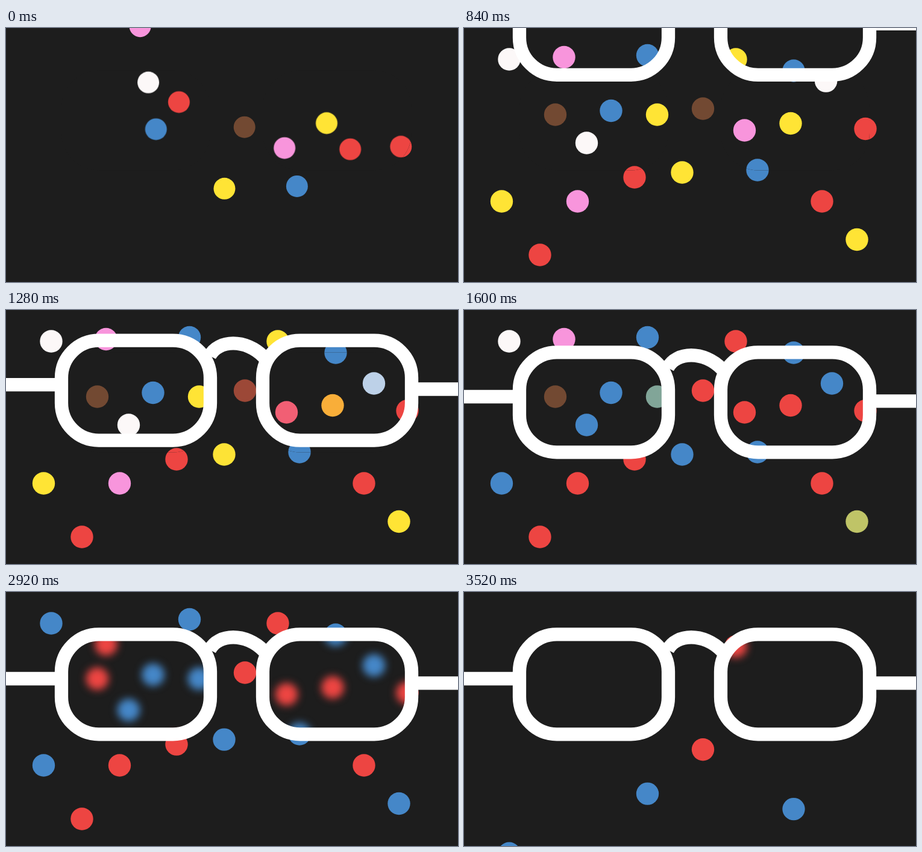
An HTML page without scripts for the animation above (3.56 s loop, 750x422 px).

```html
<!DOCTYPE html>
<html lang="en">
<head>
<meta charset="utf-8">
<title>Dots and glasses</title>
<style>
  /* One clock in milliseconds drives every part. */
  @property --t { syntax: "<number>"; inherits: true; initial-value: 0; }
  @keyframes clock { from { --t: 0; } to { --t: 3560; } }

  html, body { margin: 0; width: 100%; height: 100%; overflow: hidden; background: #1d1d1d; }
  svg { display: block; width: 750px; height: 422px; animation: clock 3.56s linear infinite; }

  .red { --from: #ed4542; --to: #ed4542; }
  .blue { --from: #4587c8; --to: #4587c8; }
  .yellow { --from: #ffe435; }
  .pink { --from: #f895dc; }
  .brown { --from: #724932; }
  .white { --from: #fcf8f8; }
  .to-red { --to: #ed4542; }
  .to-blue { --to: #4587c8; }

  /* --in: entry start, --at: colour change, --out: drop start */
  .dots circle {
    r: 18.7px;
    --in: -480;
    --at: 0;
    --dx: calc((375 - var(--x)) * .2);
    --left: calc(1 - clamp(0, (var(--t) - var(--in)) / 480, 1));
    --away: calc(var(--left) * var(--left));
    --k: calc(max(0, var(--t) - var(--out)) / 40);
    --drop: calc(5.268 * var(--k) * var(--k) / (1 + .0826 * var(--k)));
    --mix: clamp(0, (var(--t) - var(--at)) / 120, 1);
    fill: color-mix(in srgb, var(--to) calc(var(--mix) * 100%), var(--from));
    transform: translate(
      calc((var(--x) + var(--dx) * var(--away)) * 1px),
      calc((var(--y) - (var(--y) + 60) * var(--away) + var(--drop)) * 1px));
  }

  .dots {
    --rest: max(0, 1 - var(--t) / 480);
    --pan: calc(var(--rest) * var(--rest));
    transform-origin: 375px 211px;
    transform: translateY(calc(var(--pan) * 28px)) scale(calc(1 - .037 * var(--pan)));
  }

  .blurred { filter: blur(calc(clamp(0, (var(--t) - 1760) / 800, 1) * 6.6px)); }

  .glasses {
    fill: none;
    stroke: #fff;
    stroke-width: 22.3px;
    transform: translateY(calc(pow(max(0, (1580 - var(--t)) / 740), 2.3) * -159px));
  }
</style>
</head>
<body>
<svg viewBox="0 0 750 422">
  <defs>
    <rect id="left-lens" x="92" y="70.4" width="247" height="166" rx="62"/>
    <rect id="right-lens" x="426" y="70.4" width="247" height="166" rx="62"/>
    <clipPath id="lenses">
      <use href="#left-lens"/>
      <use href="#right-lens"/>
    </clipPath>
  </defs>

  <rect width="750" height="422" fill="#1d1d1d"/>

  <g id="dots" class="dots">
    <circle class="white to-blue" style="--x:75;--y:52;--in:360;--at:1680;--out:3040"/>
    <circle class="pink to-red" style="--x:166;--y:48.5;--in:300;--at:1720;--out:2800"/>
    <circle class="blue" style="--x:304.5;--y:45.5;--in:240;--out:3120"/>
    <circle class="yellow to-red" style="--x:451;--y:52;--in:200;--at:1320;--out:3400"/>
    <circle class="blue" style="--x:547;--y:71;--in:100;--out:3120"/>
    <circle class="white to-blue" style="--x:610.5;--y:122;--in:568;--dx:-53;--at:1240;--out:2920"/>
    <circle class="brown to-red" style="--x:151.5;--y:144;--in:40;--at:1640;--out:3040"/>
    <circle class="blue" style="--x:244;--y:137.5;--out:3040"/>
    <circle class="yellow to-blue" style="--x:320.5;--y:144;--in:120;--at:1520;--out:3040"/>
    <circle class="brown to-red" style="--x:396.5;--y:134;--at:1240;--out:3280"/>
    <circle class="pink to-red" style="--x:465.5;--y:170;--at:1200;--out:2920"/>
    <circle class="yellow to-red" style="--x:542;--y:158.5;--in:-297;--dx:-28;--at:1240;--out:3080"/>
    <circle class="red" style="--x:666;--y:167.5;--out:2960"/>
    <circle class="white to-blue" style="--x:203.5;--y:191;--in:-128;--dx:51;--at:1400;--out:2880"/>
    <circle class="red" style="--x:283;--y:248;--in:-136;--dx:1;--out:2880"/>
    <circle class="yellow to-blue" style="--x:362;--y:240;--at:1280;--out:2880"/>
    <circle class="blue" style="--x:487;--y:236;--out:2920"/>
    <circle class="yellow to-blue" style="--x:62.5;--y:288;--in:350;--dx:72;--at:1440;--out:3040"/>
    <circle class="pink to-red" style="--x:188.5;--y:288;--in:-13;--dx:30;--at:1360;--out:3040"/>
    <circle class="red" style="--x:594;--y:288;--in:-202;--dx:-46;--out:3160"/>
    <circle class="red" style="--x:126;--y:377;--in:60;--out:3200"/>
    <circle class="yellow to-blue" style="--x:652;--y:351.5;--in:280;--at:1560;--out:3240"/>
  </g>

  <g clip-path="url(#lenses)">
    <rect width="750" height="422" fill="#1d1d1d"/>
    <g class="blurred"><use href="#dots"/></g>
  </g>

  <g class="glasses">
    <use href="#left-lens"/>
    <use href="#right-lens"/>
    <path d="M-5 144H92M673 151.3H755M338 96C352 69 398 67 428 98"/>
  </g>
</svg>
</body>
</html>
```
